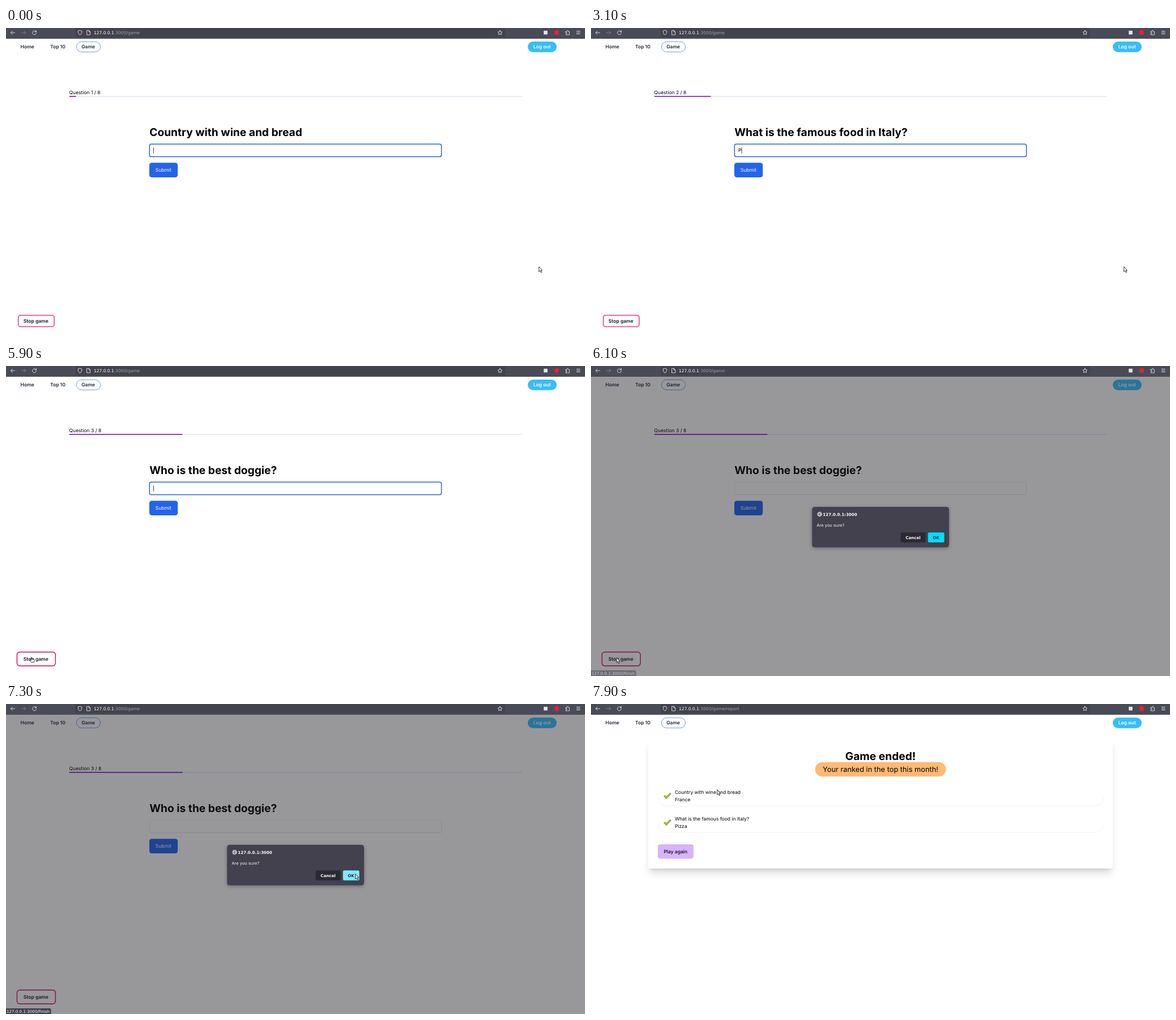
An HTML page that plays this animation: 1022 by 548 pixels, repeating every 8000 ms.

```html
<!DOCTYPE html>
<html lang="en">
<head>
<meta charset="utf-8">
<title>Quiz game</title>
<style>
  html, body { margin: 0; width: 100%; height: 100%; overflow: hidden; background: #fff; }
  svg { display: block; width: 100vw; height: 100vh; }
  text { font: 8.533px Inter, sans-serif; text-rendering: geometricPrecision; white-space: pre; }
  .ui { font: 7.11px "DejaVu Sans", sans-serif; fill: #fbfbfe; }
  .url { font-size: 7.5px; }
  .bold { font-weight: 700; }
  .nav { font-weight: 600; fill: #1f2937; }
  .title { font-size: 19.2px; font-weight: 700; }
  .mid { text-anchor: middle; }
  .icon { fill: none; stroke: #e4e4ea; stroke-width: .9; stroke-linecap: round; stroke-linejoin: round; }
</style>
</head>
<body>
<svg viewBox="0 0 1022 548" xmlns="http://www.w3.org/2000/svg">
  <rect width="1022" height="548" fill="#fff"/>

  <g id="browser">
    <rect width="1022" height="19" fill="#494b56"/>
    <rect x="122.500" y="0" width="758.500" height="16.500" rx="2" fill="#42434d"/>
    <g class="icon">
      <path d="M15.500 8.200H8.300M11.300 5.200l-3 3 3 3"/>
      <path d="M27.500 8.200h7.200M31.700 5.200l3 3-3 3" opacity=".35"/>
      <path d="M53 6.300a3.500 3.500 0 1 0 .6 2.600M53.500 4.300v2.500H51"/>
      <path d="M130.500 4.200l3.300 1.200c0 3.500-.7 5.300-3.300 6.800-2.600-1.500-3.300-3.300-3.300-6.800z"/>
      <path d="M143 4.300h3.300l2.400 2.400v5.300H143zM146.200 4.300v2.500h2.500"/>
      <path d="M872 4.200l1.200 2.500 2.700.4-2 1.900.5 2.700-2.400-1.300-2.400 1.300.5-2.700-2-1.900 2.700-.4z"/>
      <path d="M988.200 6.200h2v-.8a1.100 1.100 0 0 1 2.200 0v.8h2v5.800h-6.200V9.900h.9a1 1 0 0 0 0-2h-.9z"/>
      <path d="M1007.300 5.500h5.800M1007.300 8h5.800M1007.300 10.500h5.800"/>
    </g>
    <rect x="949.200" y="4.800" width="6.600" height="6.600" fill="#e4e4ea"/>
    <circle cx="971.800" cy="8" r="4.500" fill="#e0213f"/>
    <text class="ui url" x="155" y="10.800">127.0.0.1<tspan id="path" fill="#a0a0aa"></tspan></text>
  </g>

  <g id="nav">
    <rect x="124.400" y="24.300" width="42.200" height="18" rx="9" fill="#fff" stroke="#4f7df0" stroke-width=".8"/>
    <rect x="921" y="24" width="51" height="18.700" rx="9.350" fill="#38bdf8"/>
    <text class="nav" x="25.600" y="36.400">Home</text>
    <text class="nav" x="78" y="36.400">Top 10</text>
    <text class="nav" x="133.200" y="36.400">Game</text>
    <text class="nav" x="930.800" y="36.400" style="fill:#fff">Log out</text>
  </g>

  <g id="game">
    <text id="count" x="111.600" y="116.600"></text>
    <rect x="111.700" y="119.900" width="798.900" height="2.100" rx="1" fill="#ebe8fa"/>
    <rect id="bar" x="111.700" y="119.900" height="2.100" fill="#9540dc"/>
    <text id="question" class="title" x="253.200" y="190.700"></text>
    <rect id="fieldShade" x="253.300" y="206" width="515.300" height="22.300" rx="3.200" fill="#ececee"/>
    <rect id="field" x="253.300" y="205.300" width="515.300" height="22.200" rx="3.200" fill="#fff"/>
    <text id="answer" x="260" y="219.400"></text>
    <rect id="caret" y="211.300" width=".8" height="10.400" fill="#111"/>
    <g id="submit">
      <rect x="253" y="238.300" width="50.200" height="25.600" rx="4.200" fill="#2563eb"/>
      <text x="263.800" y="254.200" fill="#fff">Submit</text>
    </g>
    <rect id="stop" fill="#fff" stroke-width="1.600"/>
    <text class="nav" x="30.800" y="520.700" style="fill:#111827">Stop game</text>
  </g>

  <g id="report">
    <rect x="103.700" y="75" width="814.600" height="224" fill="#000" opacity=".14" style="filter:blur(6.700px)"/>
    <rect x="104" y="70" width="814" height="222" fill="#000" opacity=".1" style="filter:blur(2.700px)"/>
    <rect x="101" y="61" width="820" height="229.800" rx="3" fill="#fff"/>
    <text class="title mid" x="511" y="98.700">Game ended!</text>
    <rect x="395.700" y="102.700" width="230.800" height="25.600" rx="12.800" fill="#fdba74"/>
    <text class="mid" x="511" y="120.200" style="font-size:12.800px">Your ranked in the top this month!</text>
    <g id="results"></g>
    <rect x="118" y="248" width="63" height="25.400" rx="4.200" fill="#d8b4fe"/>
    <text x="128.400" y="264" style="font-weight:500">Play again</text>
  </g>

  <rect id="overlay" y="19" width="1022" height="529" fill="#1c1b22" opacity=".45"/>

  <g id="status">
    <path d="M0 538H77.500a2 2 0 0 1 2 2V548H0z" fill="#42414d"/>
    <text class="ui" x="1" y="546.200">127.0.0.1:3000/finish</text>
  </g>

  <g id="dialog">
    <rect x="390" y="251" width="242" height="71" rx="4.500" fill="#000" opacity=".3" style="filter:blur(3px)"/>
    <rect x="390.300" y="249" width="241.600" height="71.500" rx="4.300" fill="#42414d"/>
    <g class="icon" stroke-width=".8">
      <circle cx="403.500" cy="262" r="3.700"/>
      <ellipse cx="403.500" cy="262" rx="1.700" ry="3.700"/>
      <path d="M400.200 260.600h6.600M400.200 263.400h6.600"/>
    </g>
    <text class="ui bold" x="409.300" y="264.500">127.0.0.1:3000</text>
    <text class="ui" x="398.500" y="283.700">Are you sure?</text>
    <rect x="546.600" y="294.200" width="44" height="17.600" rx="2.100" fill="#2b2a33"/>
    <text class="ui bold mid" x="568.500" y="305.500">Cancel</text>
    <rect id="ok" x="594.800" y="294.200" width="28.800" height="17.600" rx="2.100"/>
    <text class="ui bold mid" x="609" y="305.500" style="fill:#2b2a33">OK</text>
  </g>

  <g id="pointer" fill="#fff" stroke="#111" stroke-width=".85" stroke-linejoin="round">
    <path id="arrow" d="M.4.400V9.300L2.400 7.400l1.500 3.200 1.500-.7-1.500-3.100H6.300z"/>
    <path id="hand" d="M-.6.500c0-1 1.400-1 1.500 0v3l3.300.5c1 .2 1.200.8 1.100 1.700l-.6 3H-.4L-3.400 5.400c-.6-.8.3-1.500 1-.9l1.800 1.300z"/>
  </g>
</svg>
<script>
const $ = id => document.getElementById(id);
const LOOP = 8000;
const BAR_FULL = 798.9;

// Each track lists [start time, value...]; a value holds until the next one.
const tracks = {
  answer: [[0, ''], [400, 'F'], [500, 'Fr'], [700, 'Fra'], [800, 'Fran'], [900, 'Franc'], [1000, 'France'],
    [2000, ''], [3100, 'P'], [3200, 'Pi'], [3300, 'Piz'], [3600, 'Pizz'], [3900, 'Pizza'], [5100, '']],
  question: [[0, 'Country with wine and bread'], [2000, 'What is the famous food in Italy?'],
    [5100, 'Who is the best doggie?']],
  count: [[0, 1], [1100, 2], [4000, 3]],
  progress: [[0, .015], [1100, .035], [1200, .09], [1300, .125], [4000, .15], [4100, .212], [4300, .24], [4400, .25]],
  pointer: [[0, 940.3, 421.6], [5300, 560, 436], [5400, 110, 465], [5600, 75, 492], [5700, 44.8, 515],
    [6400, 250, 405], [6500, 433.3, 301], [6700, 535, 337], [6800, 616.3, 300], [7000, 654, 300],
    [7100, 616.3, 300], [7800, 400, 215], [7900, 222.3, 151.3]],
  hover: [[0, 0], [5700, .5], [5900, 1]],
  status: [[0, 0], [6100, .5], [6200, 1], [7600, .5], [7800, 0]]
};

const at = (name, t) => tracks[name].findLast(step => step[0] <= t).slice(1);
const within = (t, from, to) => t >= from && t < to;
const show = (id, on) => $(id).setAttribute('visibility', on ? 'visible' : 'hidden');
const set = (id, attrs) => {
  for (const key in attrs) $(id).setAttribute(key, attrs[key]);
};
const write = (id, text) => {
  if ($(id).textContent !== text) $(id).textContent = text;
};

const resultRow = (question, answer, y) => `
  <path d="M118 ${y + 15}q0 15 16 15H888q16 0 16-15" fill="none" stroke="#eeeeef" stroke-width=".8"/>
  <path d="M128.600 ${y + 13.2}l1.900-1.700 2.500 2.500 6.400-6.700 1.700 1.500-8 8.900z"
    fill="#b5d51f" stroke="#53632a" stroke-width=".8" stroke-linejoin="round"/>
  <text x="147.900" y="${y + 9.2}">${question}</text>
  <text x="147.900" y="${y + 22}">${answer}</text>`;
$('results').innerHTML = resultRow('Country with wine and bread', 'France', 150)
  + resultRow('What is the famous food in Italy?', 'Pizza', 197);

function draw(t) {
  const ended = t >= 7600;
  const asking = within(t, 6100, 7400);
  const focused = t < 6100;
  const loading = within(t, 1100, 2000) || within(t, 4000, 5100);

  write('path', ':3000/game' + (ended ? '/report' : ''));
  set('game', { display: ended ? 'none' : 'inline' });
  set('report', { display: ended ? 'inline' : 'none' });

  write('count', `Question ${at('count', t)} / 8`);
  set('bar', { width: at('progress', t) * BAR_FULL });
  write('question', at('question', t)[0]);
  write('answer', at('answer', t)[0]);
  set('field', { stroke: focused ? '#2563eb' : '#d8dbe0', 'stroke-width': focused ? 1.5 : .6 });
  set('fieldShade', { display: focused ? 'none' : 'inline' });
  set('caret', {
    x: 260.2 + $('answer').getComputedTextLength(),
    display: focused && !within(t, 1200, 2000) && !within(t, 4300, 5100) ? 'inline' : 'none'
  });
  set('submit', { opacity: loading ? .75 : 1 });

  const grow = at('hover', t)[0];
  set('stop', {
    x: 21.7 - 2.3 * grow, y: 507.7 - 2.1 * grow,
    width: 63.3 + 4.6 * grow, height: 20.3 + 4.2 * grow,
    rx: 4 + grow, stroke: grow ? '#d32673' : '#e83e93'
  });

  show('overlay', asking);
  show('dialog', asking);
  set('ok', { fill: within(t, 6800, 7000) || t >= 7100 ? '#80ebff' : '#00ddff' });
  set('status', { opacity: at('status', t) });

  const [x, y] = at('pointer', t);
  const onLink = within(t, 5700, 6100);
  set('pointer', { transform: `translate(${x} ${y})` });
  show('arrow', !onLink);
  show('hand', onLink);
}

function tick() {
  draw(performance.now() % LOOP);
  requestAnimationFrame(tick);
}
tick();
</script>
</body>
</html>
```
